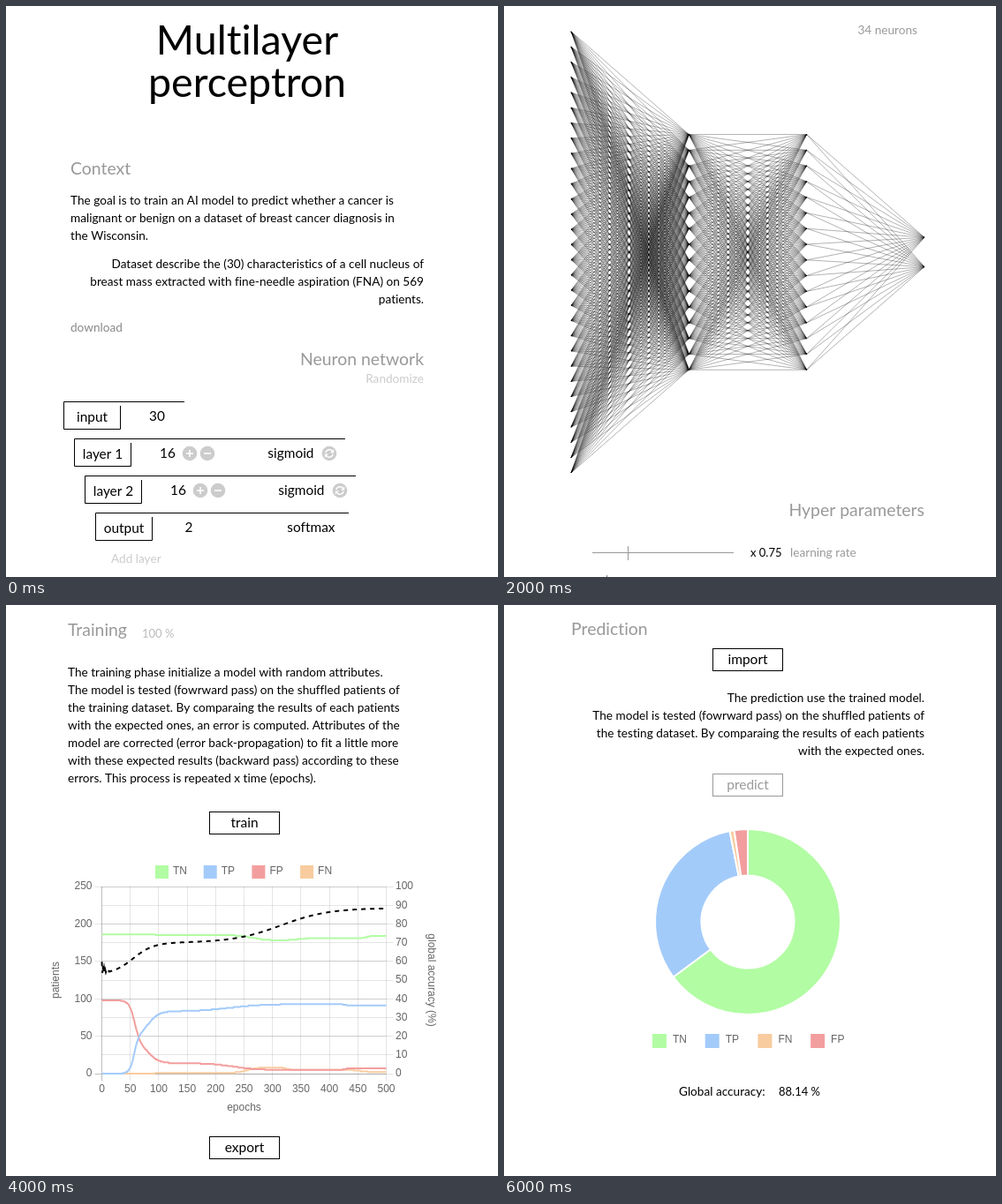
Write an HTML page with a canvas that moves like this. It is 557 px wide and 647 px high and loops after 8000 ms.

```html
<!DOCTYPE html>
<html lang="en">
<head>
<meta charset="utf-8">
<title>Multilayer perceptron</title>
<style>
html, body { margin: 0; width: 100%; height: 100%; overflow: hidden; background: #fff; }
canvas { display: block; }
</style>
</head>
<body>
<canvas id="stage" width="557" height="647"></canvas>
<script>
const ctx = document.getElementById('stage').getContext('2d');
const BODY = 'Lato, "Open Sans", sans-serif';
const CHART = '"Liberation Sans", Arial, sans-serif';
const GREY = '#999', PALE = '#ccc', GRID = 'rgba(0,0,0,.1)', AXIS = 'rgba(0,0,0,.25)';
const COLORS = { TN: '#b2fca3', TP: '#a3cbfa', FP: '#f39e9e', FN: '#f8cc9f' };
const HOLD = 2000;

function text(str, x, y, { size = 13.6, color = '#000', align = 'left' } = {}) {
  ctx.font = `${size}px ${BODY}`;
  ctx.letterSpacing = '0.01px'; // keeps ligatures off
  ctx.textBaseline = 'alphabetic';
  ctx.fillStyle = color;
  ctx.textAlign = align;
  ctx.fillText(str, x, y);
}

// Chart text, centred vertically on y.
function label(str, x, y, align = 'center') {
  ctx.font = `12px ${CHART}`;
  ctx.letterSpacing = '0px';
  ctx.textBaseline = 'middle';
  ctx.fillStyle = '#666';
  ctx.textAlign = align;
  ctx.fillText(str, x, y);
}

function lines(list, x, y, align) {
  list.forEach((s, i) => text(s, x, y + i * 20, { align }));
}

function heading(str, x, y, align) {
  text(str, x, y, { size: 19.4, color: GREY, align });
}

function stroke(points, color = '#000', width = 1) {
  ctx.beginPath();
  points.forEach(([x, y]) => ctx.lineTo(x, y));
  ctx.strokeStyle = color;
  ctx.lineWidth = width;
  ctx.stroke();
}

function button(name, x, y, color = '#000') {
  ctx.strokeStyle = color;
  ctx.lineWidth = 1;
  ctx.strokeRect(x + .5, y + .5, 79, 25);
  text(name, x + 40, y + 18, { size: 15.5, color, align: 'center' });
}

function disc(x, y) {
  ctx.fillStyle = PALE;
  ctx.beginPath();
  ctx.arc(x, y, 8.3, 0, 7);
  ctx.fill();
}

function signIcon(x, y, plus) {
  disc(x, y);
  stroke([[x - 4, y], [x + 4, y]], '#fff', 1.6);
  if (plus) stroke([[x, y - 4], [x, y + 4]], '#fff', 1.6);
}

function refreshIcon(x, y) {
  disc(x, y);
  for (const turn of [0, Math.PI]) {
    ctx.save();
    ctx.translate(x, y);
    ctx.rotate(turn);
    ctx.beginPath();
    ctx.arc(0, 0, 4.3, -2.9, -.6);
    ctx.strokeStyle = '#fff';
    ctx.lineWidth = 1.5;
    ctx.stroke();
    ctx.fillStyle = '#fff';
    ctx.beginPath();
    ctx.moveTo(5.2, -4.8);
    ctx.lineTo(5.2, -.6);
    ctx.lineTo(1, -.6);
    ctx.fill();
    ctx.restore();
  }
}

function layerRow(i, name, count, width, activation = '') {
  const x = 65.5 + i * 12, y = 448.5 + i * 42, size = 15.4;
  stroke([[x + width, y], [x, y], [x, y + 31], [x + 64, y + 31], [x + 64, y + 4.5]]);
  text(name, x + 32, y + 22.5, { size, align: 'center' });
  text(count, x + 105.5, y + 21.5, { size, align: 'center' });
  text(activation, x + 271, y + 21.5, { size, align: 'right' });
  if (name.startsWith('layer')) {
    signIcon(x + 130.5, y + 16.5, true);
    signIcon(x + 150.5, y + 16.5, false);
    refreshIcon(x + 288.5, y + 16.5);
  }
}

function intro() {
  text('Multilayer', 273, 55, { size: 46.6, align: 'center' });
  text('perceptron', 273, 103, { size: 46.6, align: 'center' });
  heading('Context', 73, 191);
  lines(['The goal is to train an AI model to predict whether a cancer is',
    'malignant or benign on a dataset of breast cancer diagnosis in',
    'the Wisconsin.'], 73, 225);
  lines(['Dataset describe the (30) characteristics of a cell nucleus of',
    'breast mass extracted with fine-needle aspiration (FNA) on 569',
    'patients.'], 473, 297, 'right');
  text('download', 73, 369, { color: '#888' });
  heading('Neuron network', 473, 407, 'right');
  text('Randomize', 473, 427, { color: PALE, align: 'right' });
  layerRow(0, 'input', '30', 136.5);
  layerRow(1, 'layer 1', '16', 306.5, 'sigmoid');
  layerRow(2, 'layer 2', '16', 306.5, 'sigmoid');
  layerRow(3, 'output', '2', 286.5, 'softmax');
  text('Add layer', 119, 631, { color: PALE });
}

// Each column's height is proportional to its neuron count.
function column(n, c) {
  return Array.from({ length: n },
    (_, i) => [76 + c * 400 / 3, 278.9 + n * 50 / 3 * (i / (n - 1) - .5)]);
}

function network() {
  text('34 neurons', 468, 32, { color: GREY, align: 'right' });
  const layers = [30, 16, 16, 2].map(column);
  for (let c = 1; c < layers.length; c++)
    for (const a of layers[c - 1])
      for (const b of layers[c]) stroke([a, b], 'rgba(0,0,0,.3)');

  heading('Hyper parameters', 476, 578, 'right');
  stroke([[100, 619.5], [260, 619.5]], GREY);
  stroke([[140.5, 612], [140.5, 628]], GREY);
  text('x 0.75', 279, 624, { size: 13 });
  text('learning rate', 324, 624, { color: GREY });
  stroke([[116.5, 645], [116.5, 647]], '#777');
}

const LEFT = 108.5, TOP = 319, W = 322, H = 212;
const px = epoch => LEFT + epoch / 500 * W;
const py = share => TOP + H * (1 - share);
const crisp = v => Math.floor(v) + .5;

function sideLabel(str, x, y, angle) {
  ctx.save();
  ctx.translate(x, y);
  ctx.rotate(angle);
  label(str, 0, 0);
  ctx.restore();
}

function legend(names, x, y, step, box, gap) {
  names.forEach((name, i) => {
    ctx.fillStyle = COLORS[name];
    ctx.fillRect(x + i * step, y, box, box);
    label(name, x + i * step + gap, y + 7, 'left');
  });
}

function axes() {
  for (let i = 0; i <= 10; i++) {
    const x = crisp(px(i * 50)), y = crisp(py(i / 10));
    stroke([[x, TOP], [x, TOP + H + 8]], i ? GRID : AXIS);
    label(i * 50, px(i * 50), 549);
    stroke([[LEFT, y], [LEFT + W + 8, y]], GRID);
    label(i * 10, 441, py(i / 10), 'left');
    if (i % 2 === 0) {
      stroke([[LEFT - 8, y], [LEFT + W, y]], i ? GRID : AXIS);
      label(i * 25, 97.5, py(i / 10), 'right');
    }
  }
  label('epochs', 269.5, 570);
  sideLabel('patients', 57, 425, -Math.PI / 2);
  sideLabel('global accuracy (%)', 481, 425, Math.PI / 2);
}

// Smooth step from 0 to 1 around epoch c, with softness w.
const rise = (e, c, w) => 1 / (1 + Math.exp((c - e) / w));

const counts = {
  FN: e => rise(e, 94, 1) + 7 * rise(e, 255, 8) - 3 * rise(e, 325, 4) - 3 * rise(e, 455, 8),
  FP: e => 98 - 58 * rise(e, 58, 5) - 26 * rise(e, 83, 9) - 9 * rise(e, 230, 20) + 2 * rise(e, 427, 3),
  TP: e => 50 * rise(e, 57, 4) + 33 * rise(e, 82, 9) + 10 * rise(e, 225, 30) - 2 * rise(e, 427, 3),
  TN: e => 186 - rise(e, 95, 1) - 7 * rise(e, 265, 12) + 3 * rise(e, 345, 10) + 3 * rise(e, 465, 4),
};

// Two learning phases, with a short wobble at the start.
const accuracy = e => 53 + 17 * rise(e, 55, 18) + 18.5 * rise(e, 315, 42)
  + 3 * Math.exp(-e / 4) * (1 + Math.cos(Math.PI * e));

function plot(fn, max, color) {
  stroke(Array.from({ length: 501 }, (_, e) => [px(e), py(fn(e) / max)]), color, 2);
}

function training() {
  heading('Training', 70, 35);
  text('100 %', 154, 37, { size: 13, color: '#bbb' });
  lines(['The training phase initialize a model with random attributes.',
    'The model is tested (fowrward pass) on the shuffled patients of',
    'the training dataset. By comparaing the results of each patients',
    'with the expected ones, an error is computed. Attributes of the',
    'model are corrected (error back-propagation) to fit a little more',
    'with these expected results (backward pass) according to these',
    'errors. This process is repeated x time (epochs).'], 70, 81);
  button('train', 230, 234);
  legend(['TN', 'TP', 'FP', 'FN'], 169, 295, 54.7, 15, 20);
  axes();
  for (const name in counts) plot(e => Math.round(counts[name](e)), 250, COLORS[name]);
  ctx.setLineDash([5, 5]);
  plot(accuracy, 100, '#000');
  ctx.setLineDash([]);
  button('export', 230, 602);
}

function doughnut(cx, cy, outer, inner, slices) {
  const total = Object.values(slices).reduce((sum, n) => sum + n);
  let a = -Math.PI / 2;
  ctx.lineJoin = 'bevel';
  for (const name in slices) {
    const b = a + slices[name] / total * Math.PI * 2;
    ctx.beginPath();
    ctx.arc(cx, cy, outer, a, b);
    ctx.arc(cx, cy, inner, b, a, true);
    ctx.closePath();
    ctx.fillStyle = COLORS[name];
    ctx.fill();
    ctx.strokeStyle = '#fff';
    ctx.lineWidth = 2;
    ctx.stroke();
    a = b;
  }
  ctx.lineJoin = 'miter';
}

function prediction() {
  heading('Prediction', 76, 34);
  button('import', 236, 49);
  lines(['The prediction use the trained model.',
    'The model is tested (fowrward pass) on the shuffled patients of',
    'the testing dataset. By comparaing the results of each patients',
    'with the expected ones.'], 476, 110, 'right');
  button('predict', 236, 191, GREY);
  doughnut(276, 359, 105, 52.5, { TN: 83, TP: 41, FN: 1, FP: 3 });
  legend(['TN', 'TP', 'FN', 'FP'], 168, 486, 59.7, 16, 23);
  text('Global accuracy:', 198, 556);
  text('88.14 %', 311, 556, { size: 13 });
}

const scenes = [intro, network, training, prediction];
let shown = -1;

function tick() {
  const i = Math.floor(performance.now() / HOLD) % scenes.length;
  if (i !== shown) {
    shown = i;
    ctx.fillStyle = '#fff';
    ctx.fillRect(0, 0, 557, 647);
    scenes[i]();
  }
  requestAnimationFrame(tick);
}
tick();
</script>
</body>
</html>
```
